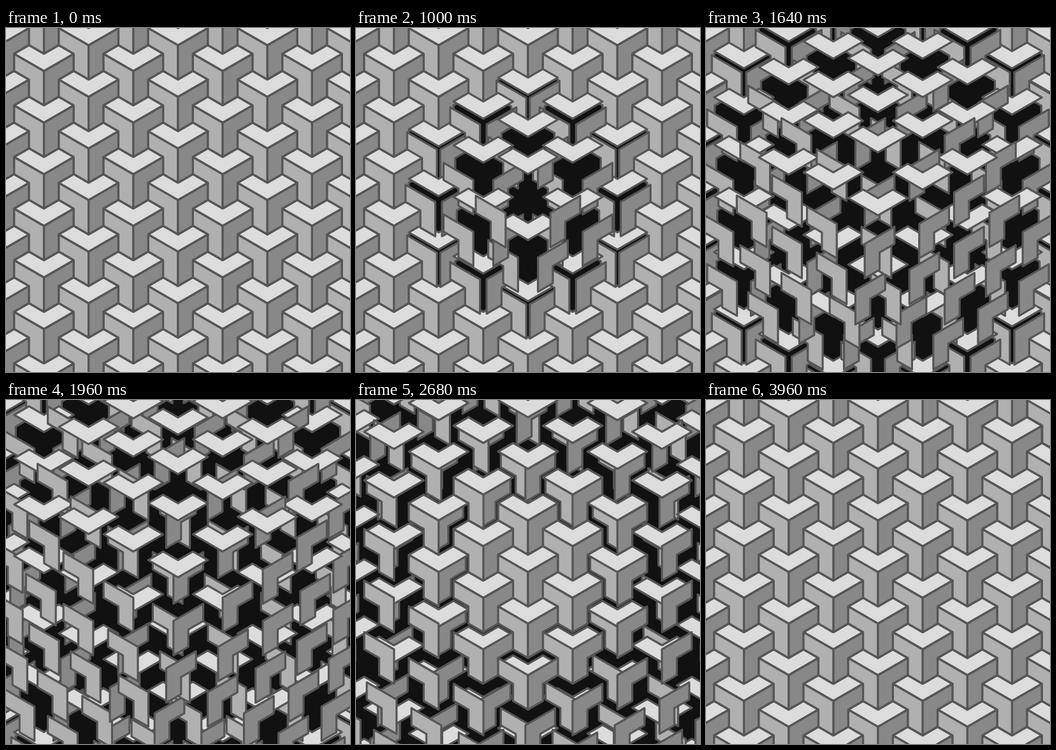
An HTML page that plays this animation: 540 px wide and 540 px high, repeating every 4 s.

```html
<!DOCTYPE html>
<html lang="en">
<head>
<meta charset="utf-8">
<title>Drifting chevrons</title>
<style>
  html, body { margin: 0; width: 100%; height: 100%; overflow: hidden; background: #111; }
  svg { display: block; width: 100%; height: 100%; }
</style>
</head>
<body>
<svg id="stage" viewBox="0 0 540 540">
  <g id="tiles" transform="translate(270 270)" stroke="#555" stroke-width="3.2" stroke-linejoin="round"></g>
</svg>
<script>
const LOOP = 4000;
const MOVE = 2000;       // travel time of one piece
const REACH = 432;       // distance the wave covers in MOVE ms
const A = 27;            // triangle side
const H = A * Math.sqrt(3) / 2;
const STEP = 3 * A;      // spacing of neighbouring cells

const chevron = [[0, 0], [2 * H, -A], [H, -1.5 * A], [0, -A], [-H, -1.5 * A], [-2 * H, -A]];

// Later kinds are painted above earlier ones at equal distance.
const kinds = [
  { turn: -120, fill: '#b0b0b0' },
  { turn: 120, fill: '#888' },
  { turn: 0, fill: '#dcdcdc' }
].map(({ turn, fill }) => {
  const r = turn * Math.PI / 180, c = Math.cos(r), s = Math.sin(r);
  const points = chevron
    .map(([x, y]) => `${(x * c - y * s).toFixed(3)},${(x * s + y * c).toFixed(3)}`)
    .join(' ');
  return { fill, points, dx: s, dy: -c };
});

function makePieces() {
  const list = [];
  for (let i = -7; i <= 7; i++) {
    for (let j = -7; j <= 7; j++) {
      const x = i * 3 * H;
      const y = (j + (i % 2 ? 0.5 : 0)) * STEP;
      const dist = Math.hypot(x, y);
      if (dist > 525) continue;
      kinds.forEach((kind, order) => list.push({ x, y, dist, kind, order }));
    }
  }
  // Far cells first, so the centre ends up on top.
  list.sort((a, b) => Math.round(b.dist) - Math.round(a.dist) || a.order - b.order);
  const tiles = document.getElementById('tiles');
  for (const p of list) {
    p.el = document.createElementNS(tiles.namespaceURI, 'polygon');
    p.el.setAttribute('points', p.kind.points);
    p.el.setAttribute('fill', p.kind.fill);
    tiles.appendChild(p.el);
  }
  return list;
}

const pieces = makePieces();
const clamp = v => Math.min(1, Math.max(0, v));
const ease = u => (1 - Math.cos(Math.PI * u)) / 2;

function draw(time) {
  for (const { x, y, dist, kind, el } of pieces) {
    const d = STEP * ease(clamp(time / MOVE - dist / REACH));
    el.setAttribute('transform',
      `translate(${(x + kind.dx * d).toFixed(3)} ${(y + kind.dy * d).toFixed(3)})`);
  }
}

const start = performance.now();
function tick() {
  draw((performance.now() - start) % LOOP);
  requestAnimationFrame(tick);
}
tick();
</script>
</body>
</html>
```
